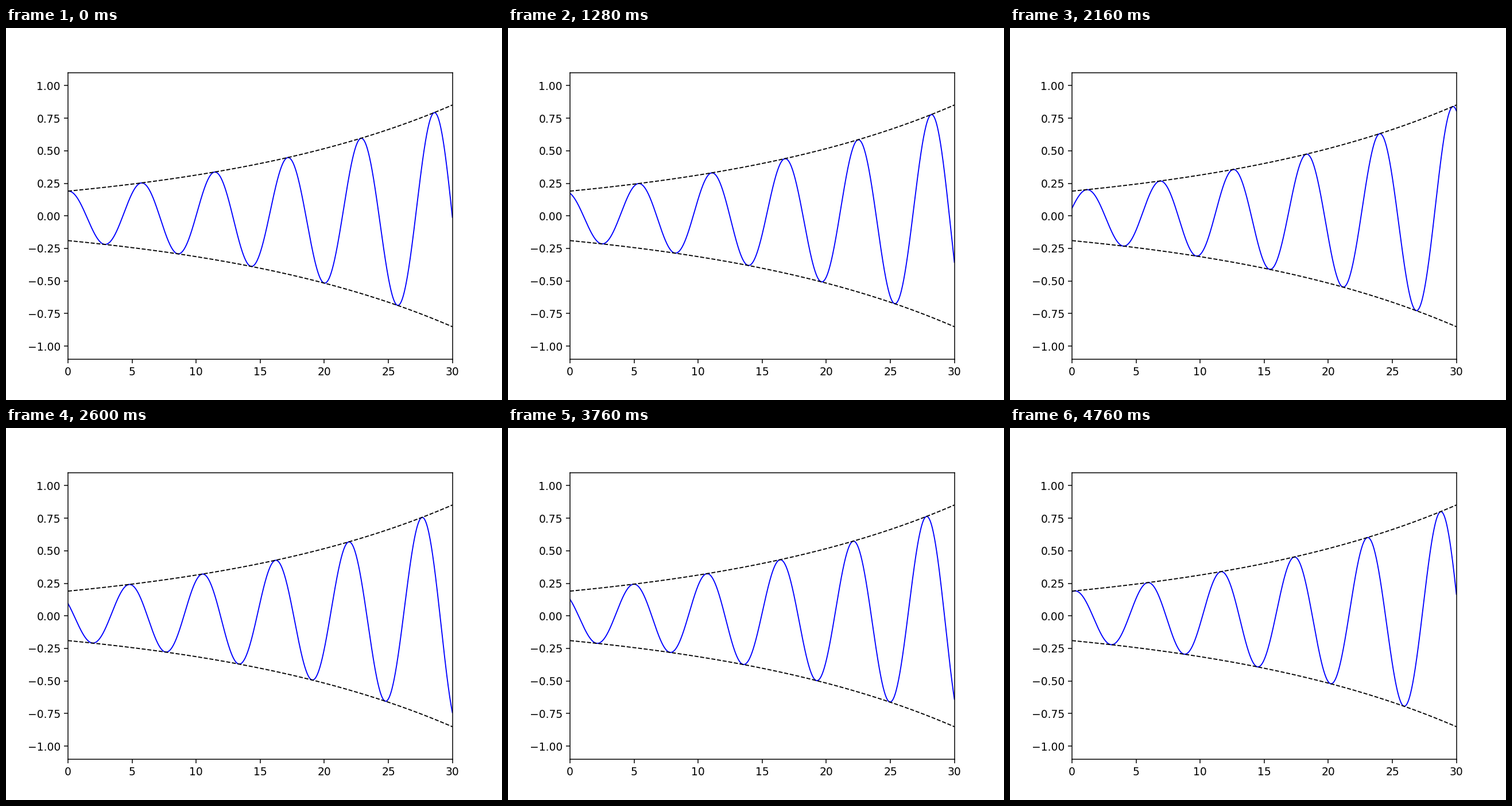
Recreate the animation shown at these times as a matplotlib script. Size 864 px wide and 648 px high, loop 4800 ms.

```python
import numpy as np
import matplotlib.pyplot as plt
from matplotlib.animation import FuncAnimation

FRAMES = 120
INTERVAL = 40          # ms
FRAMES_PER_CYCLE = 30
AMPLITUDE, GROWTH, WAVENUMBER = 0.19, 0.05, 1.1

plt.rcParams["font.family"] = "DejaVu Sans"

x = np.linspace(0, 30, 1000)
envelope = AMPLITUDE * np.exp(GROWTH * x)

fig, ax = plt.subplots(figsize=(6.4, 4.8), dpi=135)
ax.set_xlim(0, 30)
ax.set_ylim(-1.1, 1.1)

wave, = ax.plot([], [], "b-", lw=1)
for sign in (1, -1):
    ax.plot(x, sign * envelope, "k--", lw=1)


def update(frame):
    """Move the growing wave to the left by one phase step per frame."""
    phase = 2 * np.pi * frame / FRAMES_PER_CYCLE
    wave.set_data(x, envelope * np.cos(WAVENUMBER * x + phase))
    return wave,


anim = FuncAnimation(fig, update, frames=FRAMES, interval=INTERVAL,
                     repeat=True, repeat_delay=0, blit=False)

plt.show()
```
